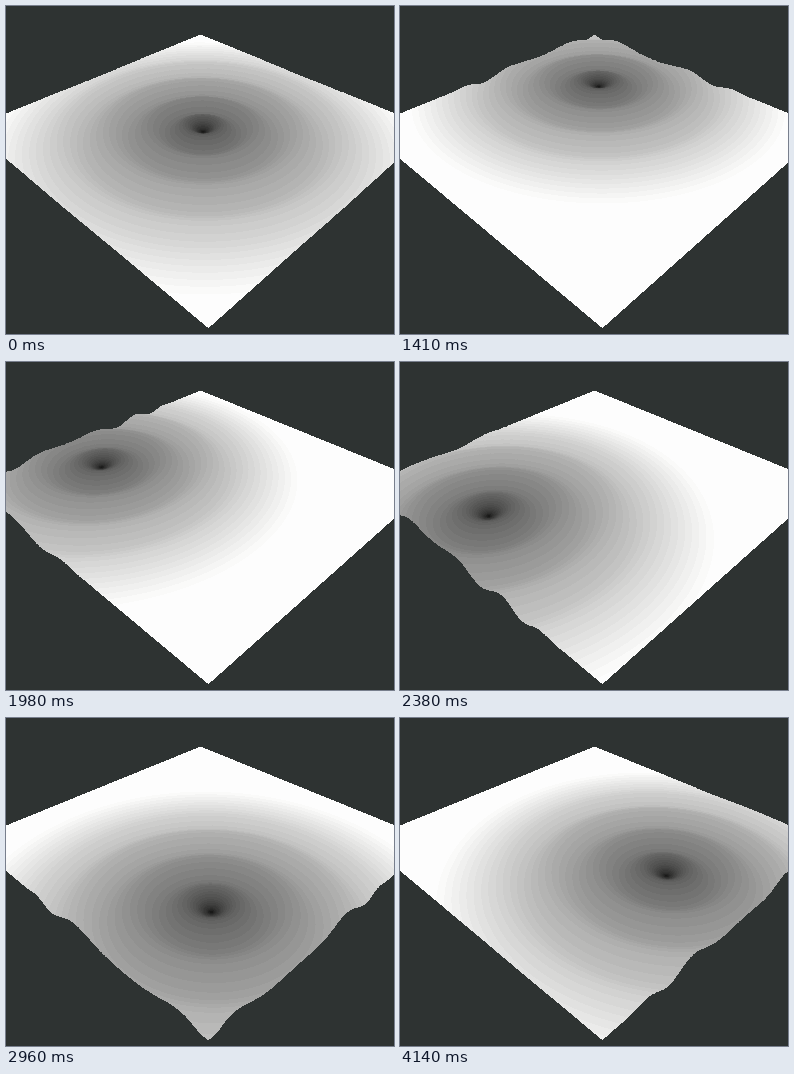
An HTML page with a canvas for the animation above (4.22 s loop, 388 px wide and 328 px high).

```html
<!DOCTYPE html>
<html lang="en">
<head>
<meta charset="utf-8">
<title>Moving well on a sheet</title>
<style>
html, body { margin: 0; width: 100%; height: 100%; overflow: hidden; background: #2e3332; }
canvas { display: block; }
</style>
</head>
<body>
<canvas id="stage" width="388" height="328"></canvas>
<script>
const W = 388, H = 328, LOOP = 4220, POSE = 82.5;
const ctx = document.getElementById('stage').getContext('2d');
const img = ctx.createImageData(W, H);
const pix = new Uint32Array(img.data.buffer);

const grey = (r, g, b) => (255 << 24 | b << 16 | g << 8 | r) >>> 0;
const BACK = grey(46, 51, 50), LIGHT = grey(253, 253, 253);

// The well spirals out and around: pose number, radius, angle in degrees
const path = [
  [0, 0, 0],
  [10, .194, 26],
  [17, .40, 88],
  [24, .49, 160],
  [29, .48, 205],
  [36, .445, 273],
  [50, .355, 320]
];

// Rate of change at a key; the well rests at both ends
function rate(i, c) {
  if (i === 0 || i === path.length - 1) return 0;
  const a = path[i - 1], b = path[i + 1];
  return (b[c] - a[c]) / (b[0] - a[0]);
}

function along(n, c) {
  let i = 0;
  while (i < path.length - 2 && n >= path[i + 1][0]) i++;
  const a = path[i], b = path[i + 1], d = b[0] - a[0];
  const u = (n - a[0]) / d, ease = u * u * (3 - 2 * u);
  return a[c] + (b[c] - a[c]) * ease
    + d * u * (1 - u) * ((1 - u) * rate(i, c) - u * rate(i + 1, c));
}

// Brightness grows with the distance from the well, in bands
function shade(r) {
  const v = Math.round((88 + 186 * r - 68 * Math.exp(-r / .04)) / 5) * 5;
  return v > 250 ? LIGHT : grey(v, v, v - 1);
}

// Rings around the well, fading out towards the flat part
function ripple(r, shift) {
  const f = Math.min(1, Math.max(0, (.75 - r) / .2));
  const near = Math.min(1, r / .3);
  return 3.4 * f * f * (3 - 2 * f) * Math.cos(2 * Math.PI * (r - shift * near) / .194);
}

const RES = 500;
const byDistance = rule => Array.from({ length: RES * 3 }, (_, i) => rule(i / RES));
const shades = byDistance(shade);

// Perspective of the sheet, whose corners lie at p = ±1 and q = ±1
const CX = 197.06, XQ = -67.6, XP = 233.3, CY = 122.5, YQ = 83.7, YP = 1.2, GQ = -.3605, GP = .009;

function draw(n) {
  const radius = along(n, 1), angle = along(n, 2) * Math.PI / 180;
  const wp = radius * Math.cos(angle), wq = -radius * Math.sin(angle);
  const shift = -.07 * (1 - radius / .45);
  const wave = byDistance(r => ripple(r, shift));
  pix.fill(BACK);
  for (let col = 0; col < W; col++) {
    const x = col + .5;
    const a = x * GQ - XQ, b = x * GP - XP, e = CX - x;
    let last = null;
    // From back to front, so nearer parts cover farther ones
    for (let y = 27; y < 324; y += .25) {
      const c = y * GQ - YQ, d = y * GP - YP, f = CY - y;
      const det = a * d - b * c;
      const q = (e * d - b * f) / det, p = (a * f - e * c) / det;
      if (Math.abs(p) + Math.abs(q) > 1) continue;
      const k = Math.round(Math.hypot(p - wp, q - wq) * RES);
      const pin = Math.min(1, Math.hypot(p, 1 - Math.abs(q)) / .07);
      const top = y + wave[k] * pin / (1 + GQ * q + GP * p);
      if (last === null) last = top;
      const end = Math.max(last, top) - .5;
      for (let row = Math.ceil(Math.min(last, top) - .5); row < end && row < H; row++) {
        pix[row * W + col] = shades[k];
      }
      last = top;
    }
  }
  ctx.putImageData(img, 0, 0);
}

let shown = -1;
const begin = performance.now();

function tick() {
  const t = (performance.now() - begin) % LOOP;
  const n = Math.min(50, Math.floor((t + 14) / POSE));
  if (n !== shown) {
    shown = n;
    draw(n);
  }
  requestAnimationFrame(tick);
}
tick();
</script>
</body>
</html>
```
